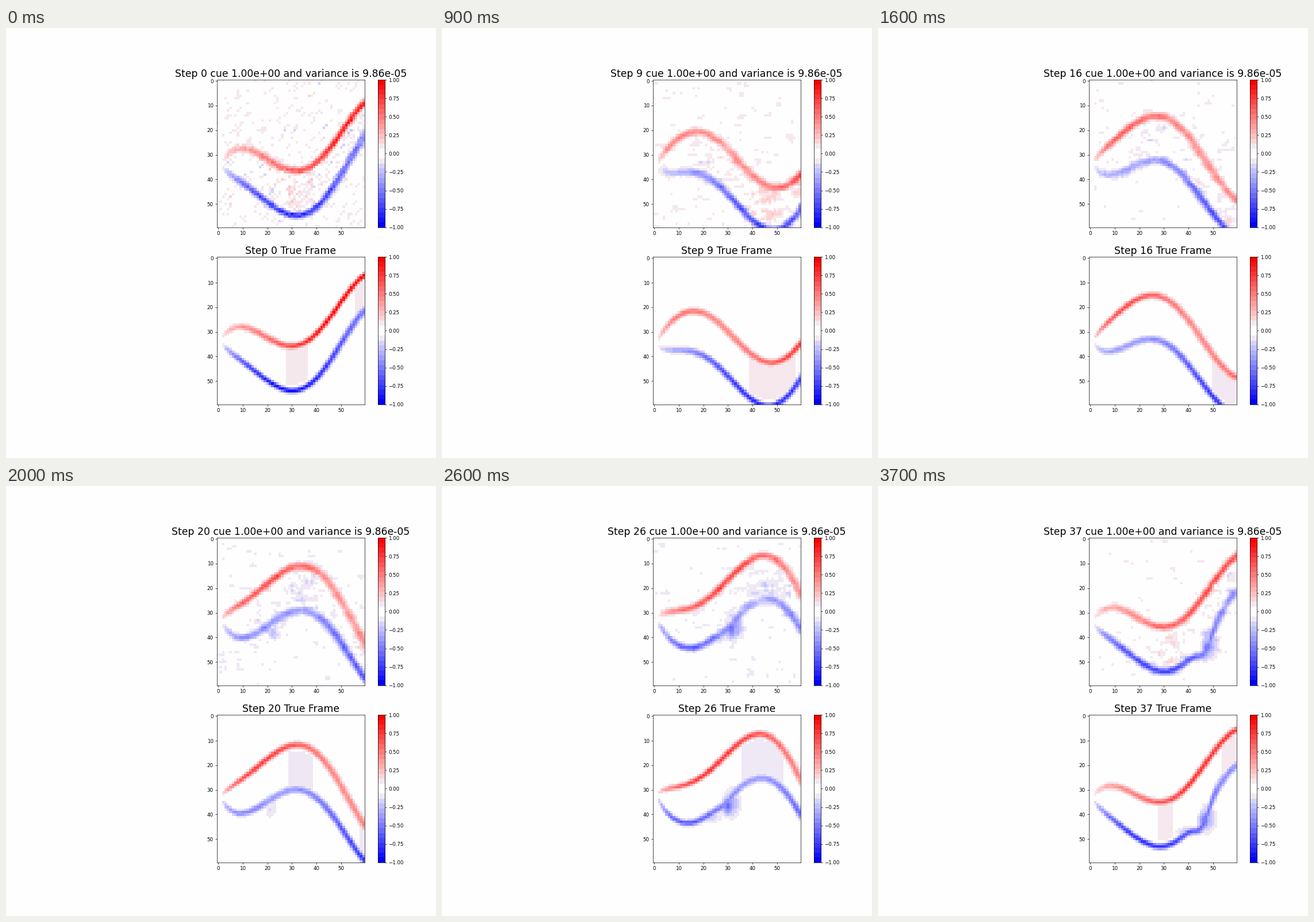
Write a matplotlib script that moves like this. It is 748 px wide and 748 px high and loops after 3.8 s.

```python
import numpy as np
import matplotlib.pyplot as plt
from matplotlib.animation import FuncAnimation
from matplotlib.colors import ListedColormap

SIZE, STEPS, N = 748, 38, 60
PAPER = "#fefefe"
SIDE = .755 / 2.2

xs = np.arange(N)
X, Y = np.meshgrid(xs, xs)


def cycle(t):
    return 2 * np.pi * t / STEPS


def vortex_place(t):
    """Position and growth of the eddy on the blue band."""
    age = t - 26
    return 30 + 1.48 * age, 36.5 + .05 * age ** 2, np.clip((t - 18) / 8, 0, 1)


def centres(t):
    """Heights of both bands: a wave that grows as it travels right."""
    theta = cycle(t) - np.radians(-104 + 4.1 * xs + .004 * xs ** 2)
    swing = (-1.8 + .56 * xs - .0027 * xs ** 2) * np.cos(theta)
    red = 24 + 10 * np.exp(-xs / 7) + swing
    red += 2.5 * (np.maximum(xs - 40, 0) / 19) ** 2
    blue = 42.3 - 9.5 * np.exp(-xs / 6) - np.maximum(xs - 40, 0) * .07 + swing
    x, _, _ = vortex_place(t)
    bulge = 6 * np.clip((t - 24) / 8, 0, 1)
    blue += bulge * np.exp(-((xs - x + 1) / 4) ** 2)
    return red, blue, theta


def band(centre, strength, t, blur):
    amp = np.clip(strength * (1 + .3 * np.exp(-t / 4) * xs / N), 0, 1)
    fade = np.clip(1 - .75 * np.exp(-(xs - 2) / 5), .1, 1) * (xs > 1)
    width = (1.25 - .6 * amp) * np.maximum(fade, .1) ** .3 * blur
    width *= np.minimum(np.hypot(1, np.gradient(centre)), 2.2)
    return amp * fade / blur ** .7 * np.exp(-((Y - centre) / width) ** 2 / 2)


def spot(x, y, sx, sy):
    return np.exp(-((X - x) / sx) ** 2 / 2 - ((Y - y) / sy) ** 2 / 2)


def vortex(t):
    x, y, power = vortex_place(t)
    return power * np.maximum.reduce([
        .55 * spot(x, y, 1.5, 2.5),
        .3 * spot(x + 1.5, y - 1, 2.2, 3.8),
        .2 * spot(x - 7, y + 4.5, 3, 1.6)])


def shade(t, red, blue):
    """Faint fill between the bands, hugging red and blue in turn."""
    out = np.zeros((N, N))
    for start, sign in ((-19, -1), (0, 1), (19, -1), (38, 1)):
        p = t - start
        if p <= -2:
            continue
        left = 27.8 + .95 * max(p, 0) + .027 * max(p, 0) ** 2
        right = 36.2 + 2.35 * p
        top = red + (0 if sign > 0 else 2.5)
        bottom = blue - (2.5 if sign > 0 else 0)
        out[(X >= left) & (X <= right) & (Y > top) & (Y < bottom)] = sign
    return out


def flow(t, blur=1, depth=.1):
    red, blue, theta = centres(t)
    warm = band(red, .62 - .16 * np.sin(theta) - .06 * np.cos(theta), t, blur)
    cold = band(blue, .6 + .22 * np.cos(theta), t, blur)
    field = warm - np.maximum(cold, vortex(t))
    fill = shade(t, red, blue)
    return np.where((np.abs(field) < .1) & (fill != 0), fill * depth, field)


def noise(step):
    rng = np.random.default_rng(100 + step)
    if step < 3:
        raw = rng.laplace(0, .03, (N + 1, N + 1))
        grain = (raw[:-1, 1:] + raw[1:, :-1]) / 1.4
    else:
        raw = rng.normal(size=(N + 1, N + 3))
        grain = sum(raw[j:j + N, i:i + N] for j in range(2) for i in range(4))
        grain *= (.028 + .014 * np.exp(-step / 12)) / np.sqrt(8)
    red, blue, _ = centres(step + 1)
    wake = (X > 15) & (Y > red) & (Y < blue)
    return grain * np.where(wake, 1.6, 1)


def palette(step):
    colours = plt.get_cmap("bwr", 30)(np.arange(30))
    warmth = np.cos(cycle(step - 5))
    colours[[13, 16], :3] = np.array(
        [243 + 4 * warmth, 232, 241 - 5 * warmth]) / 255
    colours[14:16, :3] = 254 / 255
    return ListedColormap(colours)


fig = plt.figure(figsize=(12, 12), dpi=SIZE / 12, facecolor=PAPER)


def panel(bottom):
    ax = fig.add_axes([.4904, bottom, SIDE, SIDE])
    im = ax.imshow(np.zeros((N, N)), vmin=-1, vmax=1,
                   interpolation="nearest", aspect="auto")
    ax.set_xticks(range(0, N, 10))
    ax.set_yticks(range(0, N, 10))
    bar_ax = fig.add_axes([.8644, bottom, SIDE / 20, SIDE])
    bar = bar_ax.imshow(np.linspace(-1, 1, 30)[:, None], vmin=-1, vmax=1,
                        extent=(0, 1, -1, 1), origin="lower",
                        interpolation="nearest", aspect="auto")
    bar_ax.set_xticks([])
    bar_ax.yaxis.tick_right()
    bar_ax.set_yticks(np.linspace(-1, 1, 9))
    return im, bar, ax.set_title("", fontsize=20)


guess, guess_bar, guess_title = panel(.8796 - SIDE)
truth, truth_bar, truth_title = panel(.1246)


def update(step):
    cmap = palette(step)
    for image in (guess, guess_bar, truth, truth_bar):
        image.set_cmap(cmap)
    guess.set_data(flow(step + 1, 1.2, .07) + noise(step))
    truth.set_data(flow(step))
    guess_title.set_text(
        f"Step {step} cue 1.00e+00 and variance is 9.86e-05")
    truth_title.set_text(f"Step {step} True Frame")
    return guess, truth


anim = FuncAnimation(fig, update, frames=STEPS, interval=100,
                     repeat=True, repeat_delay=0)
plt.show()
```
